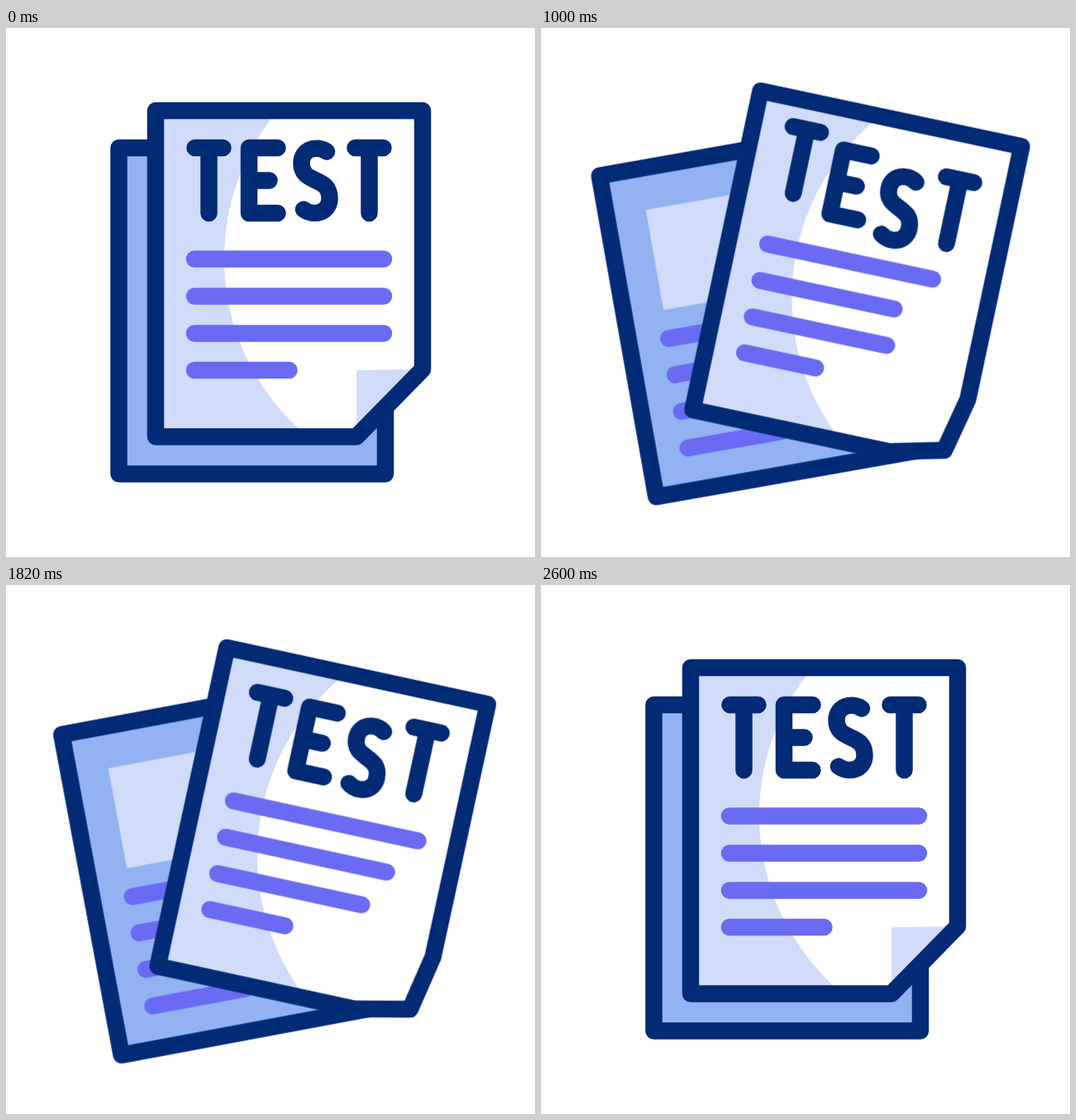
These frames come from a looping animation (640 by 640 pixels, 3 s). An HTML page without scripts:

```html
<!DOCTYPE html>
<html lang="en">
<head>
<meta charset="utf-8">
<title>Test papers</title>
<style>
  :root {
    --navy: #022a75;
    --pale: #d1dcfa;
    --smooth: cubic-bezier(.333, 0, .667, 1);
  }
  html, body { margin: 0; height: 100%; overflow: hidden; background: #fff; }
  svg { display: block; width: 100%; height: 100%; }

  .ink, .rule { fill: none; stroke-width: 20.5; stroke-linecap: round; stroke-linejoin: round; }
  .ink { stroke: var(--navy); }
  .rule { stroke: #6a6af3; }
  .pale { fill: var(--pale); }

  .back, .front, .sheet, .flap, .letter, .typed { animation: 3s var(--smooth) infinite; }

  /* The two papers fan out around the middle of their lower edges. */
  .back { transform-origin: 296px 537px; animation-name: fan; --a: -5.53deg; --b: -10deg; --c: -11.8deg; --d: -13deg; }
  .front { transform-origin: 337px 490px; animation-name: fan; --a: 6.57deg; --b: 12deg; --c: 13.9deg; --d: 15.05deg; }
  @keyframes fan {
    0% { transform: rotate(0deg); }
    6.667% { transform: rotate(0deg); animation-timing-function: cubic-bezier(.333, 0, .667, .464); }
    24% { transform: rotate(var(--a)); animation-timing-function: cubic-bezier(.333, .349, .667, .777); }
    33.333% { transform: rotate(var(--b)); animation-timing-function: cubic-bezier(.333, .638, .667, .853); }
    42.667% { transform: rotate(var(--c)); animation-timing-function: cubic-bezier(.333, .29, .667, 1); }
    53.333% { transform: rotate(var(--d)); }
    80%, 100% { transform: rotate(0deg); }
  }

  /* The corner unfolds: first the flap shrinks to the crease, then the sheet grows past it. */
  .flap { d: path("M504 413L424 414L424 494.5Z"); animation-name: flap; }
  @keyframes flap {
    0% { d: path("M504 413L424 414L424 494.5Z"); }
    6.667% { d: path("M504 413L424 414L424 494.5Z"); animation-timing-function: cubic-bezier(.333, .2, .667, .5); }
    24.667% { d: path("M504 413L464 453.75L424 494.5Z"); }
    67.333% { d: path("M504 413L464 453.75L424 494.5Z"); animation-timing-function: cubic-bezier(.333, .5, .667, 1); }
    80%, 100% { d: path("M504 413L424 414L424 494.5Z"); }
  }
  .sheet { d: path("M181 100L504 100L504 413L464 453.75L424 494.5L181 494.5Z"); animation-name: sheet; }
  @keyframes sheet {
    0% { d: path("M181 100L504 100L504 413L464 453.75L424 494.5L181 494.5Z"); }
    24.667% { d: path("M181 100L504 100L504 413L464 453.75L424 494.5L181 494.5Z"); animation-timing-function: cubic-bezier(.333, .36, .667, .75); }
    33.333% { d: path("M181 100L504 100L504 413L489 479L424 494.5L181 494.5Z"); animation-timing-function: cubic-bezier(.25, .5, .667, 1); }
    53.333% { d: path("M181 100L504 100L504 413L504 494.5L424 494.5L181 494.5Z"); animation-timing-function: cubic-bezier(.333, 0, .667, .5); }
    67.333%, 100% { d: path("M181 100L504 100L504 413L464 453.75L424 494.5L181 494.5Z"); }
  }

  .letter { animation-name: bob; animation-delay: calc(.2s + var(--i) * .2s); }
  @keyframes bob {
    0%, 53.333%, 100% { transform: translateY(0); }
    13.333% { transform: translateY(19.5px); }
    26.667% { transform: translateY(-11px); }
    40% { transform: translateY(9.7px); }
  }

  .typed {
    --len: 229; --dip: 70;
    stroke-dasharray: var(--len) 400;
    animation-name: retype;
    animation-delay: calc(.2s + var(--i) * .2s);
  }
  .short { --len: 114.5; --dip: 76; }
  @keyframes retype {
    0%, 33.333%, 60%, 100% { stroke-dashoffset: 0; }
    16.667% { stroke-dashoffset: var(--dip); }
    46.667% { stroke-dashoffset: 51; }
  }
</style>
</head>
<body>
<svg viewBox="0 0 640 640" role="img" aria-label="TEST">
  <g class="back">
    <path fill="#93b2f2" d="M136.5 145H459V539.5H136.5Z"/>
    <path class="pale" d="M184.5 195.5H411V318.5H184.5Z"/>
    <path class="rule" d="M184.5 353.5H411M184.5 398H411M184.5 443H411M184.5 488H298"/>
    <path class="ink" d="M136.5 145H459V539.5H136.5Z"/>
  </g>
  <g class="front">
    <path class="sheet" fill="#fff"/>
    <path class="pale" d="M181 100H328.7A280 280 0 0 0 365.2 494.5H181Z"/>
    <path class="flap pale"/>
    <path class="sheet ink"/>

    <path class="letter ink" style="--i:0" d="M228.5 145H262.5M245.5 145V224"/>
    <path class="letter ink" style="--i:1" d="M328.5 145H294V224H328.5M294 184.5H318.5"/>
    <path class="letter ink" style="--i:2" d="M388 149.5C375 141 357.5 147 357.5 163.5C357.5 190 391.5 178 391.5 206C391.5 224 372 228 360 219.5"/>
    <path class="letter ink" style="--i:3" d="M422.5 145H456.5M439.5 145V224"/>

    <path class="typed rule" style="--i:3" d="M228 279.5h229"/>
    <path class="typed rule" style="--i:2" d="M228 324.5h229"/>
    <path class="typed rule" style="--i:1" d="M228 369.5h229"/>
    <path class="typed rule short" style="--i:0" d="M228 414h114.5"/>
  </g>
</svg>
</body>
</html>
```
